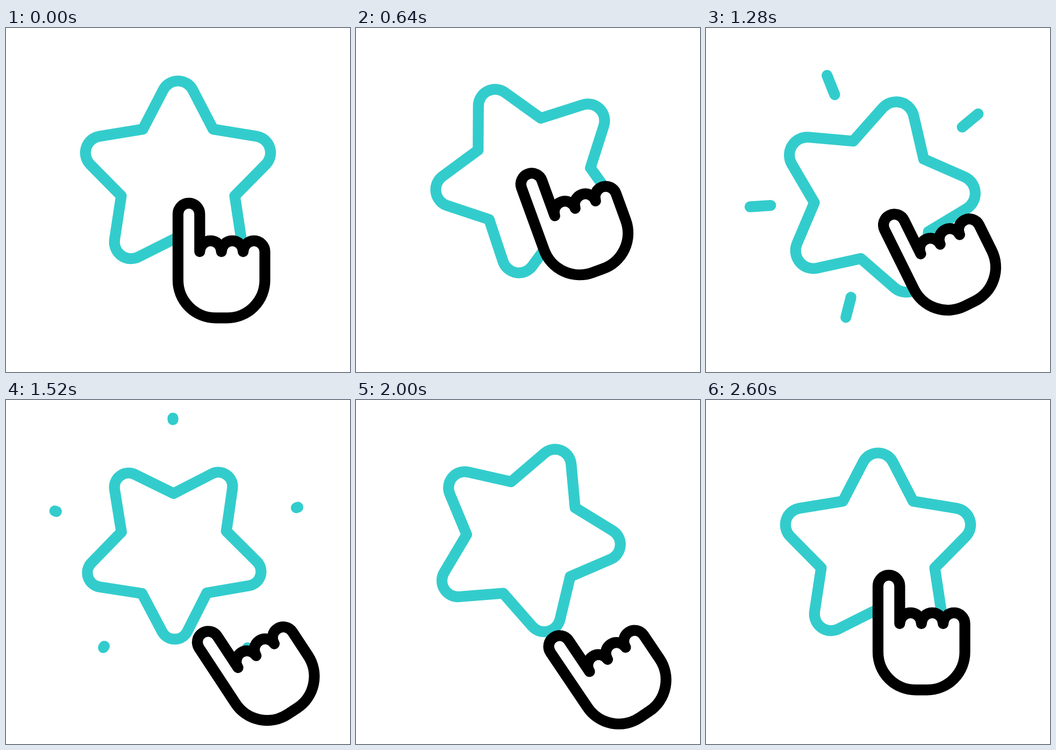
Recreate the animation shown at these times as an HTML page with a canvas. Size 640 by 640 pixels, loop 3000 ms.

```html
<!DOCTYPE html>
<html lang="en">
<head>
<meta charset="utf-8">
<title>Star tap</title>
<style>
  html, body { margin: 0; width: 100%; height: 100%; overflow: hidden; background: #fff; }
  canvas { display: block; }
</style>
</head>
<body>
<canvas id="stage" width="640" height="640"></canvas>
<script>
const ctx = document.getElementById('stage').getContext('2d');
const LOOP = 3000, TEAL = '#33cccc', RAD = Math.PI / 180;
const CENTER_Y = 13.8; // star centre below its pivot

const progress = (t, start, end) => Math.min(1, Math.max(0, (t - start) / (end - start)));

function smooth(t, start, end) {
  const u = progress(t, start, end);
  return u * u * (3 - 2 * u);
}

// A flatter ease, halfway between linear and smooth.
const glide = (t, start, end) => (progress(t, start, end) + smooth(t, start, end)) / 2;

function polar(radius, degrees) {
  return [radius * Math.cos(degrees * RAD), CENTER_Y + radius * Math.sin(degrees * RAD)];
}

function place(x, y, degrees, scale = 1) {
  ctx.translate(x, y);
  ctx.rotate(degrees * RAD);
  ctx.scale(scale, scale);
  ctx.beginPath();
}

// Resetting the transform first keeps line weights constant.
function strokePath(color) {
  ctx.resetTransform();
  ctx.strokeStyle = color;
  ctx.stroke();
}

function starPose(t) {
  return {
    y: 264.2 + 44.8 * smooth(t, 600, 1040) - 68 * smooth(t, 1180, 1760) + 23.2 * smooth(t, 1760, 2600),
    spin: -27 * smooth(t, 200, 600) + 67 * glide(t, 815, 1600) - 40 * smooth(t, 1480, 2600),
    scale: 1 + 0.07 * smooth(t, 600, 1040) - 0.17 * smooth(t, 1140, 1640) + 0.1 * smooth(t, 1640, 2120)
  };
}

function drawRays(t, { y, spin, scale }) {
  const head = smooth(t, 740, 1540), tail = smooth(t, 1060, 1580);
  if (head <= tail) return;
  place(320, y, spin, scale);
  for (let angle = 18; angle < 360; angle += 72) {
    const lift = 10 * Math.sin(angle * RAD);
    const along = k => polar(153 + 102 * k - lift, angle);
    ctx.moveTo(...along(tail));
    ctx.lineTo(...along(head));
  }
  strokePath(TEAL);
}

function drawStar({ y, spin, scale }) {
  place(320, y, spin, scale);
  ctx.moveTo(...polar(111, -126));
  for (let tip = -90; tip < 270; tip += 72) {
    const valley = polar(111, tip + 36);
    ctx.arcTo(...polar(216, tip), ...valley, 31 * scale);
    ctx.lineTo(...valley);
  }
  ctx.closePath();
  strokePath(TEAL);
}

function drawHand(t) {
  const r = 20.2, palm = 70.3;
  const away = 1 - smooth(t, 2000, 2600);
  const push = away * smooth(t, 200, 600), pull = away * smooth(t, 1000, 1600);
  place(340.2 - 13.3 * push + 51.8 * pull, 346.1 - 55.6 * push + 168 * pull, -20 * push - 14 * pull);
  ctx.arc(0, 0, r, Math.PI, 0);
  for (let i = 1; i <= 3; i++) ctx.arc(2 * r * i, 70, r, Math.PI, 0);
  ctx.arc(7 * r - palm, 123, palm, 0, Math.PI / 2);
  ctx.arc(palm - r, 123, palm, Math.PI / 2, Math.PI);
  ctx.closePath();
  ctx.fillStyle = '#fff';
  ctx.fill();
  strokePath('#000');
}

function drawFrame(t) {
  const pose = starPose(t);
  ctx.resetTransform();
  ctx.fillStyle = '#fff';
  ctx.fillRect(0, 0, 640, 640);
  ctx.lineWidth = 20.2;
  ctx.lineCap = ctx.lineJoin = 'round';
  drawRays(t, pose);
  drawStar(pose);
  drawHand(t);
}

const begin = performance.now();
function tick() {
  drawFrame((performance.now() - begin) % LOOP);
  requestAnimationFrame(tick);
}
tick();
</script>
</body>
</html>
```
